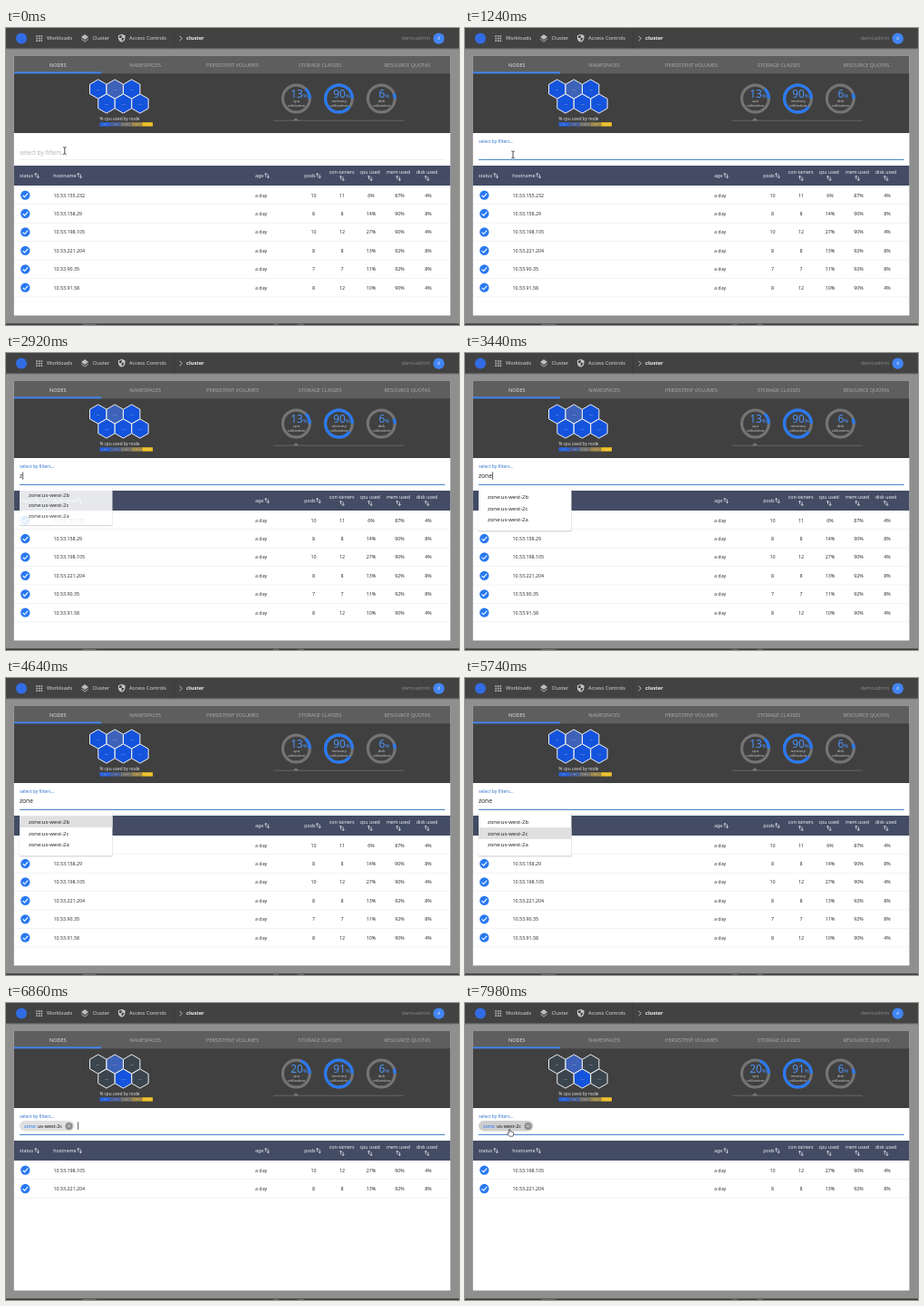
These frames come from a looping animation (500x328 px, 8000 ms). An HTML page:

```html
<!DOCTYPE html>
<html lang="en">
<head>
<meta charset="utf-8">
<title>Cluster nodes</title>
<style>
  html, body { margin: 0; width: 100%; height: 100%; overflow: hidden; background: #8f8f8f; }
  svg { display: block; width: 100vw; height: 100vh; }
  text { font-family: "Noto Sans", "Open Sans", sans-serif; white-space: pre; }
</style>
</head>
<body>
<svg id="stage" viewBox="0 0 500 328" preserveAspectRatio="xMidYMid meet"></svg>
<script>
const LOOP = 8000;
const BLUE = '#2979f2';
const LEFT = 8.8, WIDE = 481.6;          // card
const FOCUS = 720;                       // field clicked
const KEYS = [2820, 2960, 3110, 3260];   // z, o, n, e
const ARROWS = [4100, 5120];             // arrow-down presses
const PICK = 5760;                       // filter applied
const HOVER = 7480;                      // pointer over the chip

const nodes = [
  ['10.53.155.232', 10, 11, 6, 87, 4],
  ['10.53.158.29', 8, 8, 14, 90, 8],
  ['10.53.198.105', 10, 12, 27, 90, 4],
  ['10.53.221.204', 8, 8, 13, 92, 8],
  ['10.53.90.35', 7, 7, 11, 92, 8],
  ['10.53.91.58', 8, 12, 10, 90, 4],
];
const kept = [2, 3];
const gauges = [
  { x: 320.4, name: 'cpu', all: 13, some: 20 },
  { x: 367.4, name: 'memory', all: 90, some: 91 },
  { x: 414.3, name: 'disk', all: 6, some: 6 },
];
const zones = ['2b', '2c', '2a'];

const text = (x, y, s, size, fill, more = '') =>
  `<text x="${x}" y="${y}" font-size="${size}" fill="${fill}" ${more}>${s}</text>`;
const mid = (x, y, s, size, fill, more = '') =>
  text(x, y, s, size, fill, `text-anchor="middle" ${more}`);
const rect = (x, y, w, h, fill, more = '') =>
  `<rect x="${x}" y="${y}" width="${w}" height="${h}" fill="${fill}" ${more}/>`;
const circle = (x, y, r, fill, more = '') =>
  `<circle cx="${x}" cy="${y}" r="${r}" fill="${fill}" ${more}/>`;
const line = (d, stroke, width, more = '') =>
  `<path d="${d}" fill="none" stroke="${stroke}" stroke-width="${width}" ${more}/>`;
const group = (id, body, more = '') => `<g id="${id}" ${more}>${body}</g>`;

function topBar() {
  let dots = '';
  for (let i = 0; i < 9; i++)
    dots += rect(33.3 + i % 3 * 2.6, 8.2 + Math.floor(i / 3) * 2.6, 1.6, 1.6, '#bdbdbd');
  return rect(0, 0, 500, 22.5, '#424242') +
    rect(0, 22.5, 500, 1, '#000', 'opacity=".18"') +
    circle(17, 11.5, 6, '#326ce5') + dots +
    text(45, 13.3, 'Workloads', 5.65, '#d8d8d8') +
    '<path d="M87 7l4 3-4 3-4-3z" fill="#bdbdbd"/>' +
    line('M83.2 12.2l3.8 2.9 3.8-2.9', '#bdbdbd', .9) +
    text(95.5, 13.3, 'Cluster', 5.65, '#d8d8d8') +
    '<path d="M127.7 6.7l3.8 1.6v2.6q0 3.4-3.8 4.7-3.8-1.3-3.8-4.7v-2.6z" fill="#c4c4c4"/>' +
    '<path d="M127.7 7.8v3.3h2.7q-.4 2.4-2.7 3.3v-3.3h-2.7v-2.1z" fill="#424242"/>' +
    text(136, 13.3, 'Access Controls', 5.6, '#d8d8d8') +
    rect(185.3, 0, .6, 22.5, '#383838') +
    line('M191.6 8.8l2.7 2.7-2.7 2.7', '#c8c8c8', .9) +
    text(199, 13.3, 'cluster', 5.7, '#f2f2f2', 'font-weight="600"') +
    text(468.4, 13.3, 'demoadmin', 5.6, '#858585', 'text-anchor="end"') +
    circle(477.7, 11.6, 6.2, '#4285f4') + mid(477.7, 13.1, 'd', 4.4, '#dce8ff');
}

function tabs() {
  const names = ['NODES', 'NAMESPACES', 'PERSISTENT VOLUMES', 'STORAGE CLASSES', 'RESOURCE QUOTAS'];
  return rect(LEFT, 31, WIDE, 20, '#5e5e5e') +
    names.map((s, i) => mid(57.3 + i * 96.4, 43.2, s, 5.5, i ? '#ababab' : '#e4e4e4')).join('') +
    rect(LEFT, 50.3, WIDE, 65.7, '#404040') +
    rect(LEFT, 48.4, 96.4, 1.9, '#4285f4');
}

function hexes() {
  const r = 10.6, pitch = 18.5;
  let out = '';
  for (let i = 0; i < 6; i++) {
    const low = i > 2;
    const x = 101.7 + (i % 3 + (low ? .5 : 0)) * pitch, y = low ? 83.5 : 67.5;
    const pts = [...Array(6).keys()].map(k => {
      const a = (k + .5) * Math.PI / 3;
      return (x + r * Math.cos(a)).toFixed(2) + ',' + (y + r * Math.sin(a)).toFixed(2);
    }).join(' ');
    out += `<polygon class="hex" points="${pts}" stroke="#f0f0f0" stroke-width="1"/>` +
      mid(x, y + 1, [6, 27, 14, 10, 13, 11][i] + '%', 2.5, '#a9b6d2');
  }
  const scale = ['#2a63dc', '#4c6199', '#77756f', '#a08a4c', '#efc126'];
  return out + text(103.5, 101.7, '% cpu used by node', 4.7, '#dedede') +
    scale.map((c, i) => rect(103.5 + i * 11.7, 104.2, 11.7, 4.4, c) +
      mid(109.3 + i * 11.7, 107.3, i * 20 + 20, 2.5, '#c8c8c8')).join('');
}

function dials() {
  // Arcs start at three o'clock and run counterclockwise
  const arc = (g, cls, color) => circle(0, 0, 14.9, 'none',
    `class="${cls}" stroke="${color}" stroke-width="3.2" pathLength="100" transform="translate(${g.x} 78) scale(1 -1)"`);
  return gauges.map(g => arc(g, 'rest', '#747474') + arc(g, 'used', BLUE) +
    `<text x="${g.x + 3}" y="77" text-anchor="middle" font-size="11.8" font-weight="500" fill="#4b93fa">` +
    '<tspan class="num"></tspan><tspan font-size="6">%</tspan></text>' +
    mid(g.x + .3, 82.3, g.name, 4.2, '#c9c9c9') +
    mid(g.x + .3, 87, 'utilization', 4.2, '#c9c9c9')).join('') +
    line('M295 102.2H439', '#777', .7) + '<path d="M316.6 102.2l3.4-3 3.4 3z" fill="#777"/>';
}

function tableHead() {
  const sort = (x, y) =>
    line(`M${x - 1.2} ${y + 1.4}v-4m-1.3 1.4l1.3-1.4 1.3 1.4M${x + 1.4} ${y - 1.2}v4m-1.3-1.4l1.3 1.4 1.3-1.4`, '#e8ebf2', .75);
  const left = [[15, 'status', 34], [52.3, 'hostname', 81], [275, 'age', 288], [329.3, 'pods', 344.8]];
  const two = [[370.7, 'con-tainers'], [401.7, 'cpu used'], [433, 'mem used'], [464.5, 'disk used']];
  return rect(LEFT, 152, WIDE, 22, '#434c64') +
    left.map(([x, s, a]) => text(x, 164.8, s, 5.3, '#eef0f5') + sort(a, 162.9)).join('') +
    two.map(([x, s]) => mid(x, 161, s, 5.25, '#eef0f5') + sort(x, 165.7)).join('');
}

function row([host, pods, boxes, ...use]) {
  const ink = '#333';
  return '<g class="row">' + rect(LEFT, 9.9, WIDE, .5, '#e6e6e6') + circle(21.3, 0, 5.15, BLUE) +
    line('M18.6 .2l1.9 1.9 3.7-4', '#fff', 1.1) +
    text(52.4, 2, host, 5.32, ink) + text(275, 2, 'a day', 5.32, ink) +
    mid(339.5, 2, pods, 5.32, ink) + mid(371, 2, boxes, 5.32, ink) +
    use.map((v, i) => mid(403 + i * 31.5, 2, v + '%', 5.32, ink)).join('') + '</g>';
}

function field() {
  const chip = `<rect id="chipBg" x="15" y="130.1" width="60.4" height="11.4" rx="5.7"/>` +
    `<text x="20" y="137.8" font-size="5.4" font-weight="500" fill="#111"><tspan fill="${BLUE}">zone: </tspan>us-west-2c</text>` +
    circle(69.5, 135.9, 4, '#8d8d8d') +
    line('M68 134.4l3 3m0-3l-3 3', '#e4e4e4', .8);
  return rect(15, 145.2, 469.5, .5, '#dedede') +
    `<rect id="under" y="144.9" height="1" fill="#3f7fc8"/>` +
    text(0, 0, 'select by filters...', 6.55, '#b4b4b4', 'id="label"') +
    text(15, 138, '', 6.6, '#222', 'id="typed"') +
    group('chip', chip) +
    `<rect id="caret" y="131.4" width=".7" height="8.4" fill="#222"/>`;
}

function menu() {
  return rect(15, 148.6, 102.6, 49, '#000', 'opacity=".16" rx="1"') +
    rect(14.6, 148, 103.2, 49, '#000', 'opacity=".1" rx="1"') +
    rect(15, 147.8, 102.5, 48.7, '#fff', 'rx=".8"') +
    '<rect id="pickBar" x="15" width="102.5" height="12.8" fill="#e0e0e0"/>' +
    zones.map((z, i) => text(25, 160.6 + i * 12.9, 'zone:us-west-' + z, 5.9, '#222')).join('');
}

const beamPath = 'M-1.7-3.8q1.7 0 1.7.9 0-.9 1.7-.9M0-3v6.2M-1.7 4q1.7 0 1.7-.9 0 .9 1.7.9';
const beam = line(beamPath, '#fff', 1.6, 'opacity=".7"') + line(beamPath, '#222', .8);
const hand = '<path d="M-1.8 .8V-3.1q.7-1 1.4 0V-.9q.8-.5 1.3.2.8-.4 1.3.3.9-.2 1.1.6V2.2l-.8 2H-1.4L-3.7 1.1q.2-1.2 1.9-.3z" fill="#fff" stroke="#222" stroke-width=".65" stroke-linejoin="round"/>';

const stage = document.getElementById('stage');
stage.innerHTML = rect(0, 0, 500, 328, '#8f8f8f') + topBar() +
  rect(LEFT, 31, WIDE, 286.5, '#fff') + tabs() + hexes() + dials() +
  tableHead() + nodes.map(row).join('') + field() + group('menu', menu()) +
  group('beam', beam) + group('hand', hand, 'transform="translate(50.3 143)"') +
  rect(0, 326.4, 500, 1.6, '#3c3c3c') +
  rect(84, 326.8, 16, 1.2, '#666') + rect(295, 326.8, 6, 1.2, '#666') + rect(322, 326.8, 7, 1.2, '#666');

const el = id => document.getElementById(id);
const all = cls => [...stage.querySelectorAll('.' + cls)];
const rows = all('row'), hexEls = all('hex'), rest = all('rest'), used = all('used'), nums = all('num');

const set = (node, attrs) => { for (const k in attrs) node.setAttribute(k, attrs[k]); };
const show = (node, on) => node.setAttribute('visibility', on ? 'visible' : 'hidden');
const part = (t, start, span) => Math.min(1, Math.max(0, (t - start) / span));
const easeOut = x => 1 - (1 - x) ** 4;
const sine = x => (1 - Math.cos(Math.PI * x)) / 2;
const mix = (a, b, k) => a + (b - a) * k;

function draw(t) {
  const picked = t >= PICK;
  const typed = KEYS.filter(k => t >= k).length;
  const step = ARROWS.filter(k => t >= k).length;

  // Field: floating label, underline, typed text, caret
  const k = easeOut(part(t, FOCUS, 450));
  set(el('label'), {
    transform: `translate(15.2 ${mix(139.7, 127, k)}) scale(${mix(1, .75, k)})`,
    fill: t < FOCUS ? '#b4b4b4' : '#3474cf',
  });
  set(el('under'), { x: 249.75 - 234.75 * k, width: 469.5 * k });
  el('typed').textContent = picked ? '' : 'zone'.slice(0, typed);
  const last = [FOCUS, ...KEYS, ...ARROWS, PICK].filter(e => t >= e).pop();
  show(el('caret'), t >= FOCUS && t < HOVER && Math.floor((t - last) / 500) % 2 === 0);
  set(el('caret'), { x: picked ? 79 : 15 + [0, 3.1, 7.1, 11.2, 14.9][typed] + .3 });
  show(el('chip'), picked);
  set(el('chipBg'), { fill: t >= HOVER ? '#cecece' : '#e0e0e0' });

  // Suggestions
  const open = easeOut(part(t, KEYS[0], 250));
  show(el('menu'), open > 0 && !picked);
  set(el('menu'), { opacity: open, transform: `translate(0 ${147.8 * (1 - open)}) scale(1 ${open})` });
  set(el('pickBar'), { y: 152.2 + 12.9 * (step - 1), opacity: step ? 1 : 0 });

  // Table and hexagons
  rows.forEach((r, i) => {
    const slot = picked ? kept.indexOf(i) : i;
    show(r, slot >= 0);
    set(r, { transform: `translate(0 ${184.6 + slot * 20.42})` });
  });
  hexEls.forEach((h, i) => set(h, {
    fill: i === 1 ? '#3d62b8' : picked && i !== 4 ? '#3b454e' : '#1453dc',
  }));

  // Dials sweep open again after filtering
  const sweep = picked ? 100 * sine(part(t, PICK, 1100)) : 100;
  gauges.forEach((g, i) => {
    const v = picked ? g.some : g.all;
    set(rest[i], { 'stroke-dasharray': `${sweep} 200` });
    set(used[i], { 'stroke-dasharray': `${Math.min(v, sweep)} 200` });
    if (nums[i].textContent !== String(v)) nums[i].textContent = v;
  });

  // Pointer
  const m = sine(part(t, 80, 560)), drift = sine(part(t, 1500, 700));
  show(el('beam'), t < KEYS[0]);
  set(el('beam'), { transform: `translate(${mix(64.8, 53, m) - 2 * drift} ${mix(135.4, 139.8, m) + .8 * drift})` });
  show(el('hand'), t >= HOVER);
}

const begin = performance.now();
function tick() {
  draw((performance.now() - begin) % LOOP);
  requestAnimationFrame(tick);
}
draw(0);
requestAnimationFrame(tick);
</script>
</body>
</html>
```
